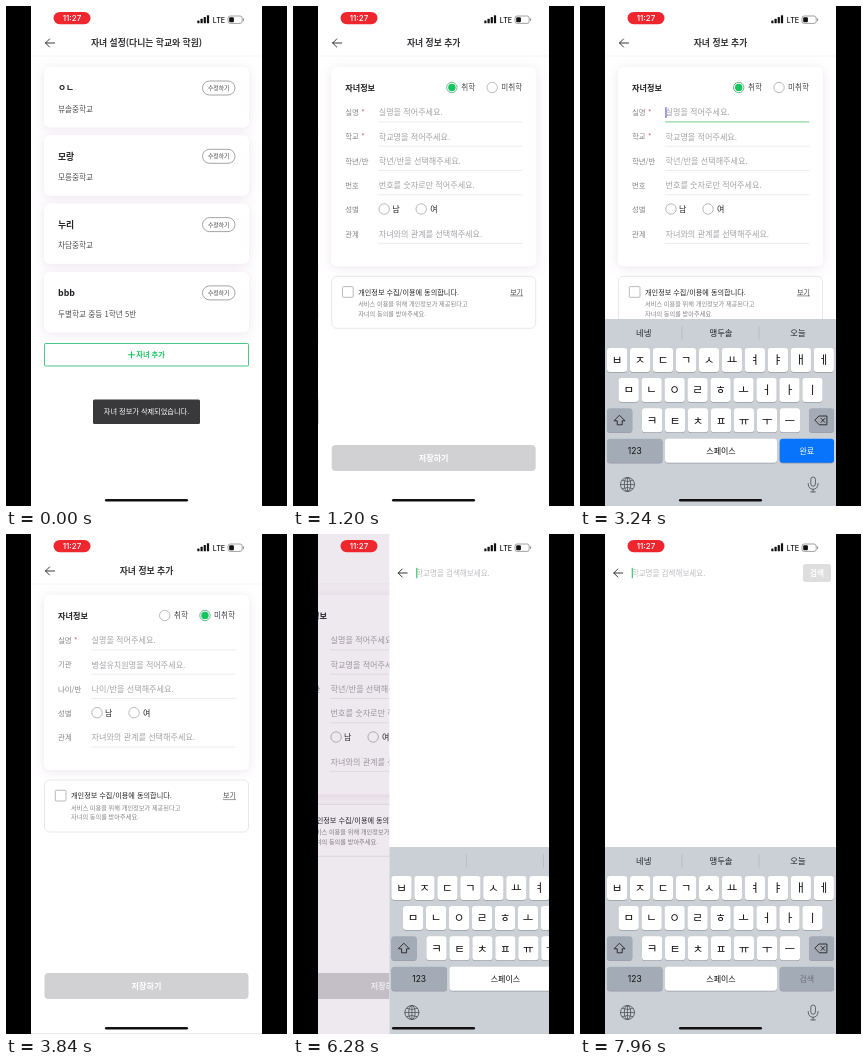
Recreate the animation shown at these times as an HTML page. Size 281 px wide and 500 px high, loop 8000 ms.

```html
<!DOCTYPE html>
<html lang="ko">
<head>
<meta charset="utf-8">
<style>
html, body { margin: 0; width: 100%; height: 100%; overflow: hidden; background: #000; }
svg { display: block; width: 100%; height: 100%; }
text { font-family: 'Noto Sans CJK KR', 'Noto Sans CJK', sans-serif; }
.latin { font-family: Inter, sans-serif; }
</style>
</head>
<body>
<svg id="stage" viewBox="0 0 281 500"></svg>
<script>
const LOOP = 8000, LEFT = 25, WIDTH = 231, KB_HEIGHT = 187;
const GREEN = '#13c45f', FOCUS = '#6bd487', INK = '#222226', GREY = '#858287', HINT = '#a5a2a8';

// Text is placed by its vertical centre.
const text = (x, y, str, size, o = {}) =>
  `<text x="${x}" y="${y + size * 0.37}" font-size="${size}" fill="${o.fill || INK}" font-weight="${o.weight || 400}"` +
  ` text-anchor="${o.anchor || 'start'}" class="${o.cls || ''}">${str}</text>`;
const mid = (x, y, str, size, o = {}) => text(x, y, str, size, { ...o, anchor: 'middle' });
const rect = (x, y, w, h, r, fill, extra = '') =>
  `<rect x="${x}" y="${y}" width="${w}" height="${h}" rx="${r}" fill="${fill}" ${extra}/>`;
const path = (d, stroke, w = 1, extra = '') =>
  `<path d="${d}" fill="none" stroke="${stroke}" stroke-width="${w}" stroke-linecap="round" stroke-linejoin="round" ${extra}/>`;
const group = (id, body) => `<g id="${id}">${body}</g>`;
const card = (y, h) => rect(38, y, 205, h, 6, '#fff', 'filter="url(#soft)"');
const arrow = (x, y) => path(`M${x + 9} ${y}H${x}M${x + 4} ${y - 4}L${x} ${y}L${x + 4} ${y + 4}`, '#222', 0.9);

const page = (id, body) => group(id,
  rect(LEFT, 0, WIDTH, 500, 0, '#fff') + body +
  rect(LEFT, 0, WIDTH, 500, 0, '#420b42', 'class="dim" opacity="0"'));
const header = title => rect(LEFT, 49.6, WIDTH, 0.8, 0, '#f4f2f5') + arrow(39.5, 37) +
  mid(140.5, 37, title, 8.8, { weight: 600, cls: 'title', fill: '#333337' });

function listPage() {
  const kids = [['ㅇㄴ', '뷰솔중학교'], ['모랑', '모릉중학교'], ['누리', '차담중학교'], ['bbb', '두별학교 중등 1학년 5반']];
  const cards = kids.map(([name, school], i) => {
    const y = 61 + i * 68.3;
    return card(y, 60.5) + text(52, y + 21, name, 8.8, { weight: 600 }) +
      text(52, y + 42, school, 7.65, { fill: '#4c4c50' }) +
      rect(196.5, y + 14, 32.5, 14, 7, '#fff', 'stroke="#8f8f94" stroke-width=".8"') +
      mid(212.7, y + 21, '수정하기', 5.8, { fill: '#444' });
  }).join('');
  return page('list', header('자녀 설정(다니는 학교와 학원)') + cards +
    rect(38.5, 337.5, 204, 22.5, 1, '#fff', 'stroke="#4cc588" stroke-width="1"') +
    path('M122.5 348.8h6M125.5 345.8v6', GREEN, 1.1) +
    text(130.3, 348.8, '자녀 추가', 7.2, { fill: GREEN, weight: 700 }) +
    rect(87, 393.5, 107, 24.5, 1.5, '#39393b') +
    mid(140.5, 405.7, '자녀 정보가 삭제되었습니다.', 7.2, { fill: '#fff' }));
}

const radio = (x, y, on) =>
  `<circle cx="${x}" cy="${y}" r="5.2" fill="#fff" stroke="${on ? '#5fae84' : '#b3b1b6'}" stroke-width=".9"/>` +
  (on ? `<circle cx="${x}" cy="${y}" r="3.7" fill="${GREEN}"/>` : '');

// Each row: label, hint (empty for the gender choice), required mark.
function formBody(id, rows, enrolled) {
  const step = 24.3, end = 114.5 + rows.length * step;
  const fields = rows.map(([label, hint, must], i) => {
    const y = 106.3 + i * step;
    return text(52, y, label, 7.4, { fill: GREY }) +
      (must ? text(68, y, '*', 7.4, { fill: '#dc5a6c' }) : '') +
      (hint
        ? text(85.5, y, hint, 8.1, { fill: HINT }) + path(`M85.5 ${y + 9.6}H229`, '#e5e3e7', 0.7)
        : radio(91, y - 0.5, false) + text(99, y - 0.5, '남', 8) +
          radio(128, y - 0.5, false) + text(137, y - 0.5, '여', 8));
  }).join('');
  const c = end + 10;
  return group(id, card(61, end - 61) + text(52, 81.5, '자녀정보', 8.15, { weight: 700 }) +
    radio(158.7, 81.5, enrolled) + text(168, 81.5, '취학', 7.6, { fill: '#444448' }) +
    radio(199, 81.5, !enrolled) + text(208, 81.5, '미취학', 7.6, { fill: '#444448' }) + fields +
    rect(38.5, c, 204, 52, 5, '#fff', 'stroke="#e3e1e5" stroke-width=".8"') +
    rect(49.3, c + 10.3, 10.7, 10.7, 1, '#fff', 'stroke="#aaa8ad" stroke-width=".8"') +
    text(65, c + 15.8, '개인정보 수집/이용에 동의합니다.', 7.15) +
    text(65, c + 27.5, '서비스 이용을 위해 개인정보가 제공된다고', 6.2, { fill: GREY }) +
    text(65, c + 37.2, '자녀의 동의를 받아주세요.', 6.2, { fill: GREY }) +
    text(217, c + 15.8, '보기', 7, { fill: '#444' }) + path(`M217.3 ${c + 19.6}H229.6`, '#555', 0.6));
}

function formPage() {
  const gender = ['성별', ''], relation = ['관계', '자녀와의 관계를 선택해주세요.'];
  const name = ['실명', '실명을 적어주세요.', true];
  return page('form', header('자녀 정보 추가') +
    formBody('school', [name, ['학교', '학교명을 적어주세요.', true], ['학년/반', '학년/반을 선택해주세요.'],
      ['번호', '번호를 숫자로만 적어주세요.'], gender, relation], true) +
    formBody('preschool', [name, ['기관', '병설유치원명을 적어주세요.'], ['나이/반', '나이/반을 선택해주세요.'],
      gender, relation], false) +
    group('focus', path('M85.5 115.9H229', FOCUS, 0.9) +
      rect(85.3, 101, 1.3, 11, 0.5, '#6b71da', 'id="nameCaret"')) +
    rect(38.5, 439, 204, 26, 4, '#d1d0d3') +
    mid(140.5, 452, '저장하기', 8.1, { fill: '#fff', weight: 600 }));
}

function keyboard(id, action, active) {
  const key = (x, y, w, label, o = {}) =>
    rect(x, y + 0.8, w, 24, 3, '#989ca4') + rect(x, y, w, 24, 3, o.bg || '#fff') +
    mid(x + w / 2, y + 12, label, o.size || 11.5, { fill: o.fill || '#111', cls: o.cls });
  const row = (x, y, chars) => [...chars].map((ch, i) => key(x + i * 22.97, y, 20.2, ch)).join('');
  const dark = '#a3abb6';
  return group(id, rect(LEFT, 313, WIDTH, KB_HEIGHT + 1, 0, '#cbd0d7') +
    path('M102 320.5v13M179 320.5v13', '#b3b8c0', 0.7) +
    group(id + 'Words', mid(63.7, 327, '네넹', 8.3) + mid(141, 327, '맹두솔', 8.4) + mid(218, 327, '오늘', 8.3)) +
    row(27, 342, 'ㅂㅈㄷㄱㅅㅛㅕㅑㅐㅔ') + row(38.6, 372, 'ㅁㄴㅇㄹㅎㅗㅓㅏㅣ') + row(62, 402.3, 'ㅋㅌㅊㅍㅠㅜㅡ') +
    key(27, 402.3, 25.3, '', { bg: dark }) + key(229, 402.3, 25, '', { bg: dark }) +
    path('M39.7 409.5l5.3 5.3h-2.8v4h-5v-4h-2.8z', '#222', 0.9) +
    path('M239.3 410h7.6v8.8h-7.6l-4.2-4.4zM241 412.4l3.8 4M244.8 412.4l-3.8 4', '#222', 0.9) +
    key(27, 432.7, 55.5, '123', { bg: dark, size: 8.5, cls: 'latin' }) +
    key(85, 432.7, 112, '스페이스', { size: 8 }) +
    key(199.7, 432.7, 54.3, action, { size: 8, bg: active ? '#0873fb' : dark, fill: active ? '#fff' : '#6d737d' }) +
    path('M40.5 478.5h14M47.5 471.5v14M42.2 474.4q5.3 2.4 10.6 0M42.2 482.6q5.3-2.4 10.6 0', '#44484e', 0.7) +
    '<g fill="none" stroke="#44484e" stroke-width=".8"><circle cx="47.5" cy="478.5" r="7"/>' +
    '<ellipse cx="47.5" cy="478.5" rx="3.2" ry="7"/><rect x="230.8" y="471" width="4.6" height="9.2" rx="2.3"/></g>' +
    path('M228.3 477.5v1a4.8 4.8 0 0 0 9.6 0v-1M233.1 483.3v2.6M230.8 485.9h4.6', '#44484e', 0.8));
}

function searchPage() {
  return page('search', arrow(33.8, 39) +
    text(51.7, 39, '학교명을 검색해보세요.', 7.55, { fill: '#bdbcc0' }) +
    rect(51.7, 33.8, 1.3, 10.5, 0.5, '#4fcb80', 'id="searchCaret"') +
    rect(223, 30, 28, 18, 3, '#dededf') + mid(237, 39, '검색', 7.5, { fill: '#fff', weight: 600 }) +
    keyboard('kb2', '검색', false));
}

const statusBar = rect(47.5, 6, 37, 12.2, 6.1, '#f0262e') +
  mid(66, 12.1, '11:27', 8, { fill: '#fff', weight: 500, cls: 'latin' }) +
  [0, 1, 2, 3].map(i => rect(191.3 + i * 3.2, 14.4 - i * 1.7, 2.2, 2.9 + i * 1.7, 0.5, '#111')).join('') +
  text(206.8, 13.9, 'LTE', 7.1, { fill: '#111', weight: 500, cls: 'latin' }) +
  rect(222, 10, 14.2, 7.4, 2.1, 'none', 'stroke="#8b8b8f" stroke-width=".8"') +
  rect(223.2, 11.2, 4.7, 5, 1, '#111') + rect(237.1, 12.3, 1, 2.8, 0.5, '#8b8b8f') +
  rect(99, 492.9, 83, 2.6, 1.3, '#111');

document.getElementById('stage').innerHTML =
  `<defs><clipPath id="screen"><rect x="${LEFT}" width="${WIDTH}" height="500"/></clipPath>` +
  '<filter id="soft" x="-15%" y="-40%" width="130%" height="180%">' +
  '<feDropShadow dx="0" dy="1.5" stdDeviation="5.5" flood-color="#a878ac" flood-opacity=".2"/></filter></defs>' +
  `<g clip-path="url(#screen)">${listPage()}${formPage()}${keyboard('kb1', '완료', true)}${searchPage()}${statusBar}</g>`;

const $ = id => document.getElementById(id);
const show = (id, on) => $(id).setAttribute('visibility', on ? 'inherit' : 'hidden');
const move = (id, x, y = 0) => $(id).setAttribute('transform', `translate(${x.toFixed(2)} ${y.toFixed(2)})`);

// Critically damped spring from 0 to 1.
function spring(ms) {
  if (ms <= 0) return 0;
  if (ms > 600) return 1;
  const a = ms * 0.0183;
  return 1 - (1 + a) * Math.exp(-a);
}
const blink = ms => ms >= 0 && ms % 1000 < 500;

const T = { form: 680, focus: 1874, preschool: 3400, school: 4600, search: 6150, words: 6480 };

// The old page drifts left and dims while the next one slides over it.
function cover(id, p) {
  const el = $(id), title = el.querySelector('.title');
  el.querySelector('.dim').setAttribute('opacity', 0.13 * p);
  title.setAttribute('opacity', Math.max(0, 1 - 1.6 * p));
  return -WIDTH * 0.3 * p;
}

function render(t) {
  const toForm = spring(t - T.form), toSearch = spring(t - T.search);
  const kb = spring(t - T.focus) - spring(t - T.preschool);
  const focused = t >= T.focus && t < T.preschool;
  const young = t >= T.preschool && t < T.school;

  move('list', cover('list', toForm));
  move('form', WIDTH * (1 - toForm) + cover('form', toSearch));
  move('search', WIDTH * (1 - toSearch));
  move('kb1', 0, KB_HEIGHT * (1 - kb));

  show('list', toForm < 1);
  show('form', toForm > 0);
  show('search', toSearch > 0);
  show('kb1', kb > 0);
  show('school', !young);
  show('preschool', young);
  show('focus', focused);
  show('nameCaret', blink(t - T.focus));
  show('searchCaret', blink(t - T.search + 270));
  show('kb2Words', t >= T.words);
}

const start = performance.now();
function tick() {
  render((performance.now() - start) % LOOP);
  requestAnimationFrame(tick);
}
tick();
</script>
</body>
</html>
```
